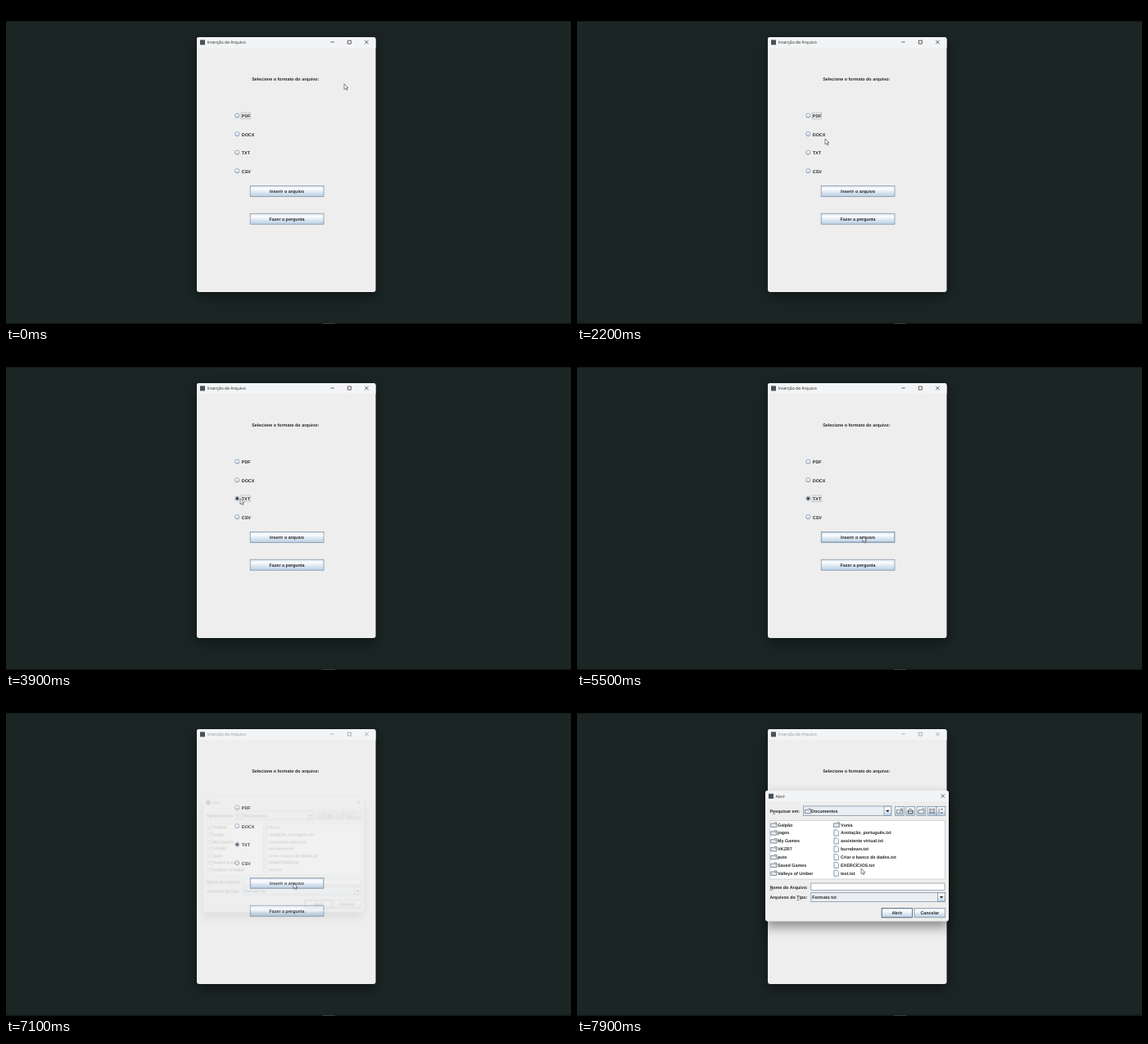
An HTML page that plays this animation: 690 by 388 pixels, repeating every 8000 ms.

```html
<!DOCTYPE html>
<html lang="pt-BR">
<head>
<meta charset="utf-8">
<title>Inserção de Arquivo</title>
<style>
html, body { margin: 0; width: 100%; height: 100%; overflow: hidden; background: #1a2524; }
svg { display: block; width: 100%; height: 100%; }
text { font: bold 5.38px "Liberation Sans", Arial, sans-serif; fill: #262626; text-rendering: geometricPrecision; white-space: pre; }
.title { font: 5.1px "Open Sans", sans-serif; }
.mid { text-anchor: middle; }
.line { fill: none; stroke: #222; stroke-width: .7; }
.edge { stroke: #7a8a99; stroke-width: .7; }
.focus { fill: none; stroke: #a3afba; stroke-width: .6; }
.window { filter: drop-shadow(0 5px 8px rgba(0, 0, 0, .42)); }
.panel { filter: drop-shadow(0 7px 7px rgba(0, 0, 0, .42)); }

.anim { animation: 8s step-end infinite; }
#cursor { animation-name: travel; }
#arrow { animation-name: arrow; }
#beam { animation-name: beam; }
#focusPdf { animation-name: focus-pdf; }
#focusTxt { animation-name: focus-txt; }
#armed { animation-name: armed; }
#dot { animation-name: dot; }
#hover { animation-name: hover; }
#press { animation-name: press; }
#bar { animation-name: dim; }
#dialog { animation-name: open; transform-origin: 341px 193px; }
#caret { animation-name: caret; }

@keyframes travel {
  0% { transform: translate(413px, 95px); }
  1.25% { transform: translate(440px, 118px); }
  2.5% { transform: translate(461px, 150px); }
  3.75% { transform: translate(373px, 185px); }
  12.5% { transform: translate(345px, 189px); }
  13.75% { transform: translate(305px, 150px); }
  15% { transform: translate(325px, 117px); }
  18.75% { transform: translate(325px, 117px); animation-timing-function: steps(3, start); }
  22.5% { transform: translate(295px, 138px); animation-timing-function: steps(2, start); }
  25% { transform: translate(305px, 149px); }
  27.5% { transform: translate(303px, 162px); }
  28.75% { transform: translate(292px, 174px); }
  30% { transform: translate(298px, 178px); }
  32.5% { transform: translate(298px, 178px); animation-timing-function: steps(9, start); }
  43.75% { transform: translate(285.5px, 178.5px); }
  48.75% { transform: translate(286px, 179px); }
  50% { transform: translate(286px, 179px); animation-timing-function: steps(5, start); }
  56.25% { transform: translate(348.5px, 225px); }
  68.75% { transform: translate(348.5px, 225px); animation-timing-function: steps(6, start); }
  76.25% { transform: translate(351px, 225.5px); }
  77.5% { transform: translate(351px, 226px); }
  90% { transform: translate(354px, 227px); }
  91.25% { transform: translate(354px, 227px); animation-timing-function: steps(7, start); }
  100% { transform: translate(347px, 208px); }
}
@keyframes arrow { 0%, 91.25%, 100% { opacity: 1; } 90% { opacity: 0; } }
@keyframes beam { 0%, 91.25%, 100% { opacity: 0; } 90% { opacity: 1; } }
@keyframes focus-pdf { 0% { opacity: 1; } 43.75%, 100% { opacity: 0; } }
@keyframes focus-txt { 0%, 80%, 100% { opacity: 0; } 43.75% { opacity: 1; } }
@keyframes armed { 0%, 46.25%, 100% { opacity: 0; } 43.75% { opacity: 1; } }
@keyframes dot { 0% { opacity: 0; } 46.25%, 100% { opacity: 1; } }
@keyframes hover { 0% { opacity: 0; } 53.75%, 100% { opacity: 1; } }
@keyframes press { 0%, 81.25%, 100% { opacity: 0; } 80% { opacity: 1; } }
@keyframes dim { 0% { opacity: 1; } 88.75%, 100% { opacity: .48; } }
@keyframes caret { 0%, 96.25%, 100% { opacity: 0; } 90% { opacity: 1; } }
@keyframes open {
  0% { opacity: 0; transform: none; }
  88.75% { opacity: .18; transform: translate(-3px, -1.5px) scale(.875); }
  90% { opacity: 1; transform: scale(.986); }
  91.25%, 100% { opacity: 1; transform: none; }
}
</style>
</head>
<body>
<svg id="stage" viewBox="0 0 690 388" preserveAspectRatio="none"></svg>
<script>
const rect = (x, y, w, h, fill, more = '') =>
  `<rect x="${x}" y="${y}" width="${w}" height="${h}" fill="${fill}" ${more}/>`;
const text = (x, y, s, cls = '') => `<text x="${x}" y="${y}" class="${cls}">${s}</text>`;
const line = (d, more = '') => `<path d="${d}" class="line" ${more}/>`;
const box = (x, y, w, h, fill = 'url(#steel)') => rect(x, y, w, h, fill, 'class="edge"');
const group = (id, body, cls = 'anim') => `<g id="${id}" class="${cls}">${body}</g>`;
const u = s => `<tspan text-decoration="underline">${s}</tspan>`;
const cross = (x, y) => line(`M${x - 2.2} ${y - 2.2}l4.4 4.4m0-4.4l-4.4 4.4`);
const circle = (x, y, r, fill, more = '') => `<circle cx="${x}" cy="${y}" r="${r}" fill="${fill}" ${more}/>`;

const button = (x, y, w, h, label) =>
  box(x, y, w, h) + text(x + w / 2, y + h / 2 + 2, label, 'mid');
const radio = (y, label) =>
  circle(282.3, y, 2.6, 'url(#steel)', 'class="edge"') + text(287.8, y + 2.3, label);
const dropArrow = (x, y, w, h) =>
  box(x, y, w, h) + `<path d="M${x + w / 2 - 2.2} ${y + h / 2 - 1}h4.4l-2.2 2.6z" fill="#222"/>`;
const folder = (x, y) =>
  `<path d="M${x} ${y - 1.6}h3.6l1-1.2h2.4v5.6h-7z" fill="#e4edf5" stroke="#56626e" stroke-width=".7"/>` +
  line(`M${x + 4} ${y - 1}h3`, 'stroke-opacity=".5"');
const sheet = (x, y) =>
  `<path d="M${x} ${y - 3.4}h3.6l1.9 1.9v5.2h-5.5z" fill="#f4f8fc" stroke="#5f7890" stroke-width=".7"/>`;

const rowY = i => 154.6 + i * 9.83;
const column = (names, icon, iconX, textX, start = 0) => names.map((name, i) =>
  icon(iconX, rowY(i + start)) + text(textX, rowY(i + start) + 2, name)).join('');

const folders = ['Galpão', 'jogos', 'My Games', 'VKZR7', 'puts', 'Saved Games', 'Valleys of Umber'];
const files = ['Anotação_português.txt', 'assistente virtual.txt', 'burndown.txt',
  'Criar o banco de dados.txt', 'EXERCÍCIOS.txt', 'text.txt'];

const defs = `<defs><linearGradient id="steel" x2="0" y2="1">
  <stop offset="0" stop-color="#dde8f3"/><stop offset=".3" stop-color="#fbfdff"/>
  <stop offset=".5" stop-color="#e6eef6"/><stop offset="1" stop-color="#b8cfe5"/>
</linearGradient></defs>`;

const backdrop = rect(0, 0, 690, 388, '#1a2524') + rect(0, 0, 690, 18.5, '#000') +
  rect(0, 386.7, 690, 1.3, '#101716') + rect(387, 386.9, 15, 1.1, '#343d3d');

const mainWindow =
  rect(233, 38, 218.5, 311, '#eee', 'rx="3" class="window"') +
  `<path d="M233 51v-10q0-3 3-3h212.5q3 0 3 3v10z" fill="#f3f4f5"/>` +
  rect(237, 41.4, 6, 6, '#46525c') +
  group('bar', text(245.6, 46.2, 'Inserção de Arquivo', 'title') +
    line('M396.4 44h4.2M417.3 42.1h4v4h-4z') + cross(440.4, 44.1)) +
  text(341.3, 91.2, 'Selecione o formato do arquivo:', 'mid') +
  ['PDF', 'DOCX', 'TXT', 'CSV'].map((s, i) => radio(133.7 + i * 22.5, s)).join('') +
  group('focusPdf', rect(287, 130, 11.6, 7.8, 'none', 'class="focus"')) +
  group('focusTxt', rect(287, 175, 11.6, 7.8, 'none', 'class="focus"')) +
  group('armed', circle(282.3, 178.7, 2.3, '#a3b8cc')) +
  group('dot', circle(282.3, 178.7, 1.6, '#2b2f33')) +
  button(298.2, 219.4, 89.8, 13, 'Inserir o arquivo') +
  group('hover', rect(298.8, 220, 88.6, 11.8, 'none', 'stroke="#8fa9c2" stroke-width=".8"')) +
  group('press', box(298.2, 219.4, 89.8, 13, '#a9bfd6') + text(343.1, 227.9, 'Inserir o arquivo', 'mid')) +
  button(298.2, 253.2, 89.8, 13, 'Fazer a pergunta');

const toolX = [388.6, 401.8, 415, 428.2, 439];
const tools = toolX.map(x => box(x, 132.3, 10.8, 11)).join('') +
  folder(390.5, 138) + line('M394 139.5l3-3') +
  line('M404.4 138v3h5.6v-3M403.8 138l3.4-2.8 3.4 2.8z') +
  folder(417, 138) +
  line('M430.6 135.2h2v2h-2zM434.6 135.2h2v2h-2zM430.6 139h2v2h-2zM434.6 139h2v2h-2z', 'stroke-opacity=".7"') +
  line('M441.4 135.8h1.5M444 135.8h3M441.4 138h1.5M441.4 140.2h1.5M444 140.2h3');

const dialog =
  rect(230, 113, 224, 159.6, '#eee', 'rx="3" class="panel"') +
  `<path d="M230 126v-10q0-3 3-3h218q3 0 3 3v10z" fill="#f3f4f6"/>` +
  rect(234, 116.8, 6, 6, '#46525c') + text(242.6, 121.8, 'Abrir', 'title') + cross(446.8, 119.6) +
  text(235.4, 139.8, `P${u('e')}squisar em:`) +
  box(276.4, 132, 107.4, 11.6, '#e9eef3') + folder(278.4, 138) +
  text(286, 139.8, 'Documentos') + dropArrow(375, 132, 8.8, 11.6) + tools +
  rect(235.4, 149.4, 214, 71.6, '#fff', 'stroke="#b5bec7" stroke-width=".6"') +
  column(folders, folder, 236.8, 245) +
  column(['Vunia'], folder, 313.4, 322) +
  column(files, sheet, 313.9, 322, 1) +
  text(235.4, 232.8, `${u('N')}ome do Arquivo:`) + box(285.8, 226, 163.2, 8.6, '#fff') +
  group('caret', line('M287.2 227.2v6.2')) +
  text(235.4, 245, `Arquivos do ${u('T')}ipo:`) + box(285.8, 237.4, 163.8, 11, '#e9eef3') +
  text(287.2, 245, 'Formato txt') + dropArrow(440.6, 237.4, 9, 11) +
  button(372.2, 256.4, 37.2, 11.4, 'Abrir') +
  rect(372.2, 256.4, 37.2, 11.4, 'none', 'stroke="#5d6c7a" stroke-width=".8"') +
  button(412, 256.4, 37.6, 11.4, 'Cancelar');

const cursor =
  group('arrow', '<path d="M0 0V6.7L1.6 5.3L2.7 7.7L3.9 7.2L2.8 4.9H4.9Z" fill="#fff" stroke="#333" stroke-width=".6"/>') +
  group('beam', line('M-1.3-3h2.6M0-3v6M-1.3 3h2.6'));

document.getElementById('stage').innerHTML =
  defs + backdrop + mainWindow + group('dialog', dialog) + group('cursor', cursor);
</script>
</body>
</html>
```
